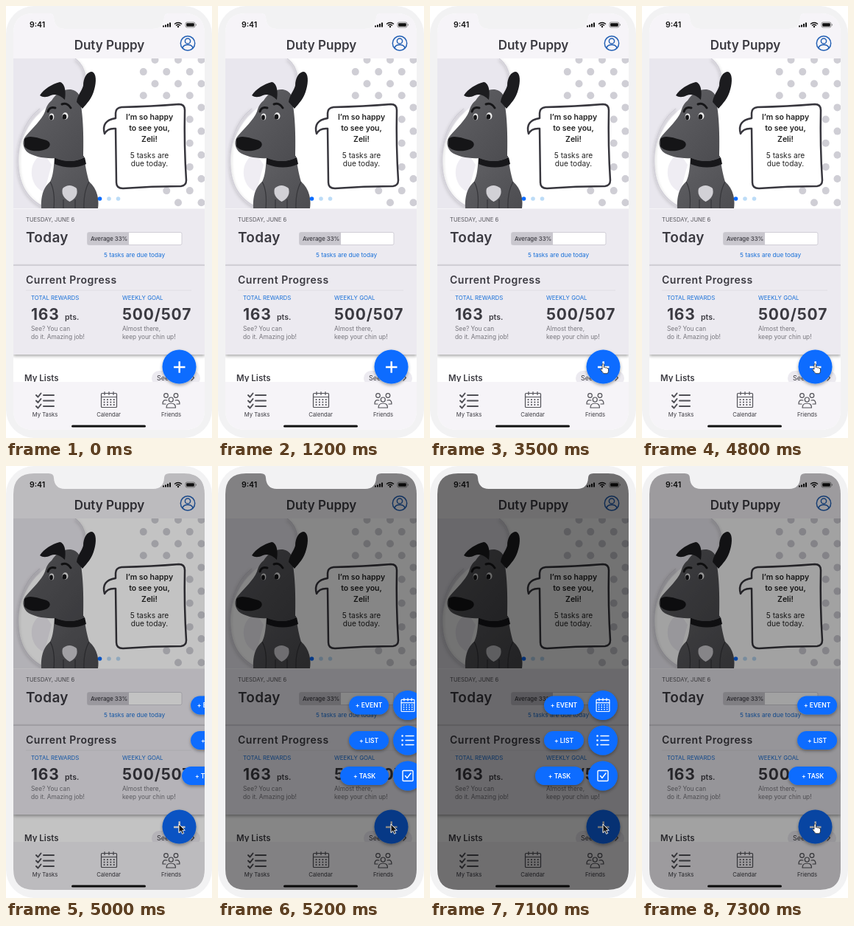
Animation, 280 px wide and 585 px high, one loop 7.4 s. Source, as an HTML page:

```html
<!DOCTYPE html>
<html lang="en">
<head>
<meta charset="utf-8">
<title>Task app prototype</title>
<style>
  html, body { margin: 0; width: 100%; height: 100%; overflow: hidden; background: #fff; }
  svg { display: block; width: 100%; height: 100%; font-family: Inter, Roboto, sans-serif; fill: #3b3a41; }
  .b { font-weight: 600; }
  .mid { text-anchor: middle; }
  .blue { fill: #176fd8; }
  .soft { fill: #76757c; }
  .line { fill: none; stroke: #505056; stroke-width: 1.2; stroke-linecap: round; stroke-linejoin: round; }
  .thick { stroke-width: 2; }
  .white { stroke: #fff; stroke-width: 1.4; }
</style>
</head>
<body>
<svg viewBox="0 0 280 585">
  <defs>
    <clipPath id="screen">
      <path d="M38 10H58Q65 10 65 16Q66 31 80 31H200Q214 31 215 16Q215 10 222 10H242Q270 10 270 38V546Q270 574 242 574H38Q10 574 10 546V38Q10 10 38 10Z"/>
    </clipPath>
    <clipPath id="hero"><path d="M10 71H270V274.500H10Z"/></clipPath>
    <filter id="shadow" x="-40%" y="-40%" width="180%" height="200%">
      <feDropShadow dx="0" dy="2" stdDeviation="2" flood-opacity=".35"/>
    </filter>
    <linearGradient id="fur" x2="1" y2="1">
      <stop stop-color="#626266"/><stop offset="1" stop-color="#4c4c50"/>
    </linearGradient>
    <g id="calendar">
      <rect x="-10.500" y="-9" width="21" height="19" rx="1"/>
      <path d="M-10.500 -4H10.500M-6 -11V-7M0 -11V-7M6 -11V-7"/>
      <path d="M-6.500 -.5H7.500M-6.500 3H7.500M-6.500 6.500H7.500" stroke-width="2" stroke-dasharray=".1 4.300"/>
    </g>
  </defs>

  <rect width="280" height="585" rx="38" fill="#f2f2f3"/>
  <g clip-path="url(#screen)">
    <rect width="280" height="585" fill="#fff"/>
    <rect x="10" y="10" width="260" height="61" fill="#f6f4f8"/>

    <g id="status">
      <text class="b" x="32" y="29" font-size="10.500" fill="#111">9:41</text>
      <path d="M214 28.500V26.500M217 28.500V25.500M220 28.500V24M223 28.500V22.500" stroke="#111" stroke-width="2"/>
      <path d="M229 24.500Q234 20.500 239 24.500M231 26.500Q234 24 237 26.500" fill="none" stroke="#111" stroke-width="1.400"/>
      <circle cx="234" cy="28" r="1.200" fill="#111"/>
      <rect x="244" y="22" width="13" height="7" rx="2" fill="none" stroke="#777" stroke-width=".8"/>
      <rect x="245.200" y="23.200" width="10.600" height="4.600" rx="1" fill="#111"/>
      <path d="M258.300 24.500V26.500" stroke="#777"/>
    </g>
    <text class="b mid" x="140.500" y="58.500" font-size="17">Duty Puppy</text>
    <g fill="none" stroke="#2360b4" stroke-width="1.500">
      <circle cx="247" cy="50.500" r="9.700"/><circle cx="247" cy="47.500" r="3.600"/>
      <path d="M240 57Q241 52.500 247 52.500T254 57"/>
    </g>

    <g clip-path="url(#hero)">
      <path d="M10 71H94C112 85 111 107 99 126C60 118 12 165 17 221C20 252 37 266 55 274H10Z" fill="#e9e7ee"/>
      <path d="M94 71C112 85 111 107 99 126M46 139C22 157 14 190 17 221C20 252 37 266 55 274" fill="none" stroke="#d0ced6" stroke-width="1.500" filter="url(#shadow)"/>
      <path d="M52 200C28 208 30 244 52 252L62 215Z" fill="#efedf3"/>
      <g id="dots" fill="#cfced5"></g>

      <g id="dog">
        <path d="M66 203C65 219 64 230 60 238C50 246 47 260 48 274H125C127 260 123 246 113 238C110 228 108 218 106 203Z" fill="url(#fur)"/>
        <path d="M60 238Q67 250 65 274M113 238Q105 252 106 274M78 274V262M94 274V262" fill="none" stroke="#37373b" stroke-width="1.300"/>
        <path d="M66 205Q88 215 107 205L109 214Q89 223 66 214Z" fill="#17171a"/>
        <path d="M62 128C72 112 92 108 99 120C104 140 106 165 105 205C96 211 80 212 67 206C54 207 36 204 28 197C22 190 22 182 27 176C36 165 48 155 53 143C55 136 57 132 62 128Z" fill="url(#fur)"/>
        <path d="M80 127C75 122 68 118 61 121C55 124 50 124 46 121C52 112 62 106 73 103C80 104 82 116 80 127Z" fill="#1c1c1f"/>
        <path d="M96 130C97 121 103 115 105 108C105 97 110 89 117 89C123 91 123 103 120 113C117 125 110 132 104 139Z" fill="#1c1c1f"/>
        <path d="M25 180C30 174 42 178 52 181C62 183 62 191 54 194C44 198 30 197 25 190Z" fill="#151517"/>
        <path d="M57 143Q59 136 67 138M76 133Q83 130 88 138" fill="none" stroke="#161618" stroke-width="3" stroke-linecap="round"/>
        <ellipse cx="62" cy="150" rx="3.300" ry="4.500" fill="#eee"/><ellipse cx="80.500" cy="149" rx="4" ry="4.700" fill="#eee"/>
        <ellipse cx="61.500" cy="151" rx="2.400" ry="3.400" fill="#151517"/><ellipse cx="79.500" cy="150" rx="2.800" ry="3.600" fill="#151517"/>
        <path d="M77 247Q86 239 96 247Q99 259 86.500 265Q74 258 77 247Z" fill="#d2d1d6"/>
      </g>

      <path d="M157 137Q198 136 235 133Q243 133 243 141Q242 190 245 236Q245 243 238 244Q198 244 159 247Q150 247 150 239L149 166Q138 165 134 173Q129 155 149 152V145Q149 138 157 137Z" fill="#fff" stroke="#38373e" stroke-width="2.500" stroke-linejoin="round"/>
      <g class="mid" fill="#222">
        <g class="b" font-size="10.500">
          <text x="195" y="154">I’m so happy</text><text x="195" y="168.500">to see you,</text><text x="195" y="183.500">Zeli!</text>
        </g>
        <g font-size="10.200"><text x="195" y="206">5 tasks are</text><text x="195" y="217">due today.</text></g>
      </g>
      <circle cx="127.500" cy="261" r="2.800" fill="#0a6cff"/>
      <circle cx="140" cy="261" r="2.800" fill="#bcdcf7"/><circle cx="152.500" cy="261" r="2.800" fill="#bcdcf7"/>
    </g>

    <g id="today">
      <rect x="10" y="274.500" width="260" height="77" fill="#eceaf0"/>
      <text x="27" y="292" font-size="7.600" fill="#56555b">TUESDAY, JUNE 6</text>
      <text class="b" x="27" y="320" font-size="19" letter-spacing=".3">Today</text>
      <rect x="110.500" y="306.500" width="128.500" height="17" rx="2" fill="#fff" stroke="#d0ced6"/>
      <path d="M113 306.500H167V323.500H113Q110.500 323.500 110.500 321V309Q110.500 306.500 113 306.500Z" fill="#c9c7ce"/>
      <text x="115" y="317.800" font-size="7.800" font-weight="500">Average 33%</text>
      <text class="blue" x="133" y="340" font-size="8.200">5 tasks are due today</text>
    </g>

    <g id="progress">
      <rect x="10" y="351" width="260" height="121" fill="#eceaf0" filter="url(#shadow)"/>
      <path d="M10 351H270" stroke="#bbb9c1"/>
      <path d="M27 385H252" stroke="#dfdde4"/>
      <text class="b" x="27" y="375.500" font-size="14" letter-spacing=".5">Current Progress</text>
      <g class="blue" font-size="7.850"><text x="34" y="398">TOTAL REWARDS</text><text x="158" y="398">WEEKLY GOAL</text></g>
      <g font-size="21" font-weight="700" letter-spacing=".8">
        <text x="34" y="424.500">163</text><text x="158" y="424.500">500/507</text>
      </g>
      <text class="b" x="80" y="424.500" font-size="10.500">pts.</text>
      <g class="soft" font-size="8.300">
        <text x="34" y="440">See? You can</text><text x="34" y="451">do it. Amazing job!</text>
        <text x="158" y="440">Almost there,</text><text x="158" y="451">keep your chin up!</text>
      </g>
    </g>

    <text class="b" x="25" y="508" font-size="11.500">My Lists</text>
    <rect x="198" y="494" width="66" height="20" rx="10" fill="#eceaf0"/>
    <text x="205" y="507" font-size="9">See All</text><path class="line" d="M252 500L255.500 503.500L252 507"/>

    <g id="tabs">
      <rect x="10" y="509" width="260" height="66" fill="#f6f4f8"/>
      <path class="line thick" d="M51 527H65M51 534.500H65M51 542H65M41 527L43.500 529.500L47.500 524.500M41 534.500L43.500 537L47.500 532M41 542L43.500 544.500L47.500 539.500"/>
      <use class="line" href="#calendar" x="140" y="533.500"/>
      <g class="line">
        <circle cx="217.500" cy="527.500" r="2.800"/><circle cx="231" cy="527.500" r="2.800"/><circle cx="224.300" cy="533" r="3"/>
        <path d="M218 544Q218 538 224.300 538T230.500 544ZM219 534Q213 532 213 539H217M230 534Q236 532 236 539H232"/>
      </g>
      <g class="mid" font-size="7.700">
        <text x="53" y="556">My Tasks</text><text x="139.500" y="556">Calendar</text><text x="224.500" y="556">Friends</text>
      </g>
      <rect x="89" y="567.500" width="101" height="3" rx="1.500" fill="#111"/>
    </g>

    <circle cx="235.500" cy="488.500" r="23" fill="#0a6cff" filter="url(#shadow)"/>
    <path d="M228 489H243.500M235.700 481.300V496.700" stroke="#fff" stroke-width="2.500"/>

    <rect id="dim" width="280" height="585" fill="#000"/>
    <g id="menu"></g>

    <path id="arrow" d="M0 0V11.500L2.700 9L4.600 13.300L6.700 12.400L4.800 8.300H8.300Z" fill="#111" stroke="#fff" stroke-width=".9"/>
    <path id="hand" d="M2.500 7V1Q2.500 -.5 3.700 -.5T5 1V4.500Q6.500 3.500 7.200 5Q8.800 4 9.300 5.600Q11 5 11 7V9.500Q10.800 11 9.800 12.700H4.500Q3 10.500 .3 7.700Q.5 5.900 2.500 7Z" transform="translate(231.500 485)" fill="#fff" stroke="#222" stroke-width=".8"/>
  </g>
</svg>

<script>
const LOOP = 7400, STEP = 100;
const OPEN_AT = 4863, CLOSE_AT = 7196, SLIDE_MS = 489, SLIDE_PX = 168;
const CURSOR_IN = 1500, CURSOR_MS = 1000, HOVER_AT = 2500;
const byId = id => document.getElementById(id);

// Staggered dots behind the speech bubble
let dots = '';
for (let row = 0; row < 13; row++) {
  const y = 73 + row * 16.1;
  for (let x = 171 + (row % 2) * 15.75; x < 280; x += 31.5) {
    if (x > (y < 130 ? 180 : 210)) dots += `<circle cx="${x}" cy="${y}" r="5"/>`;
  }
}
byId('dots').innerHTML = dots;

const menuItems = [
  ['EVENT', 324, 155, '<use href="#calendar" transform="scale(.85)"/>'],
  ['LIST', 371.5, 155, '<path d="M-3 -6H8M-3 0H8M-3 6H8"/><path d="M-7.500 -6H-7.400M-7.500 0H-7.400M-7.500 6H-7.400" stroke-width="2.600"/>'],
  ['TASK', 419.5, 143, '<rect x="-7" y="-7" width="14" height="14" rx="1"/><path d="M-3.500 0L-1 3L4 -3.500"/>']
];
byId('menu').innerHTML = menuItems.map(([label, y, left, icon]) => `
  <g fill="#0a6cff" filter="url(#shadow)">
    <rect x="${left}" y="${y - 12.5}" width="${209 - left}" height="25" rx="12.500"/>
    <circle cx="235" cy="${y}" r="20"/>
  </g>
  <text class="b mid" x="${(left + 209) / 2}" y="${y + 3}" font-size="8.500" fill="#fff">+ ${label}</text>
  <g class="line white" transform="translate(235 ${y})">${icon}</g>`).join('');

const easeOut = t => 1 - (1 - Math.min(1, Math.max(0, t))) ** 1.7;
const show = (id, on) => byId(id).setAttribute('visibility', on ? 'visible' : 'hidden');

function draw(now) {
  const t = Math.floor((now % LOOP) / STEP) * STEP;
  const open = easeOut((t - OPEN_AT) / SLIDE_MS) - easeOut((t - CLOSE_AT) / SLIDE_MS);
  byId('dim').setAttribute('opacity', 0.55 * open);
  byId('menu').setAttribute('transform', `translate(${SLIDE_PX * (1 - open)} 0)`);
  show('menu', open > 0);

  const hover = (t >= HOVER_AT && t < OPEN_AT) || t >= CLOSE_AT;
  const away = 1 - easeOut((t - CURSOR_IN) / CURSOR_MS);
  byId('arrow').setAttribute('transform', `translate(${235 + 3 * away} ${485 + 52 * away})`);
  show('arrow', t >= CURSOR_IN && !hover);
  show('hand', hover);
}

const start = performance.now();
function tick() {
  draw(performance.now() - start);
  requestAnimationFrame(tick);
}
tick();
</script>
</body>
</html>
```
